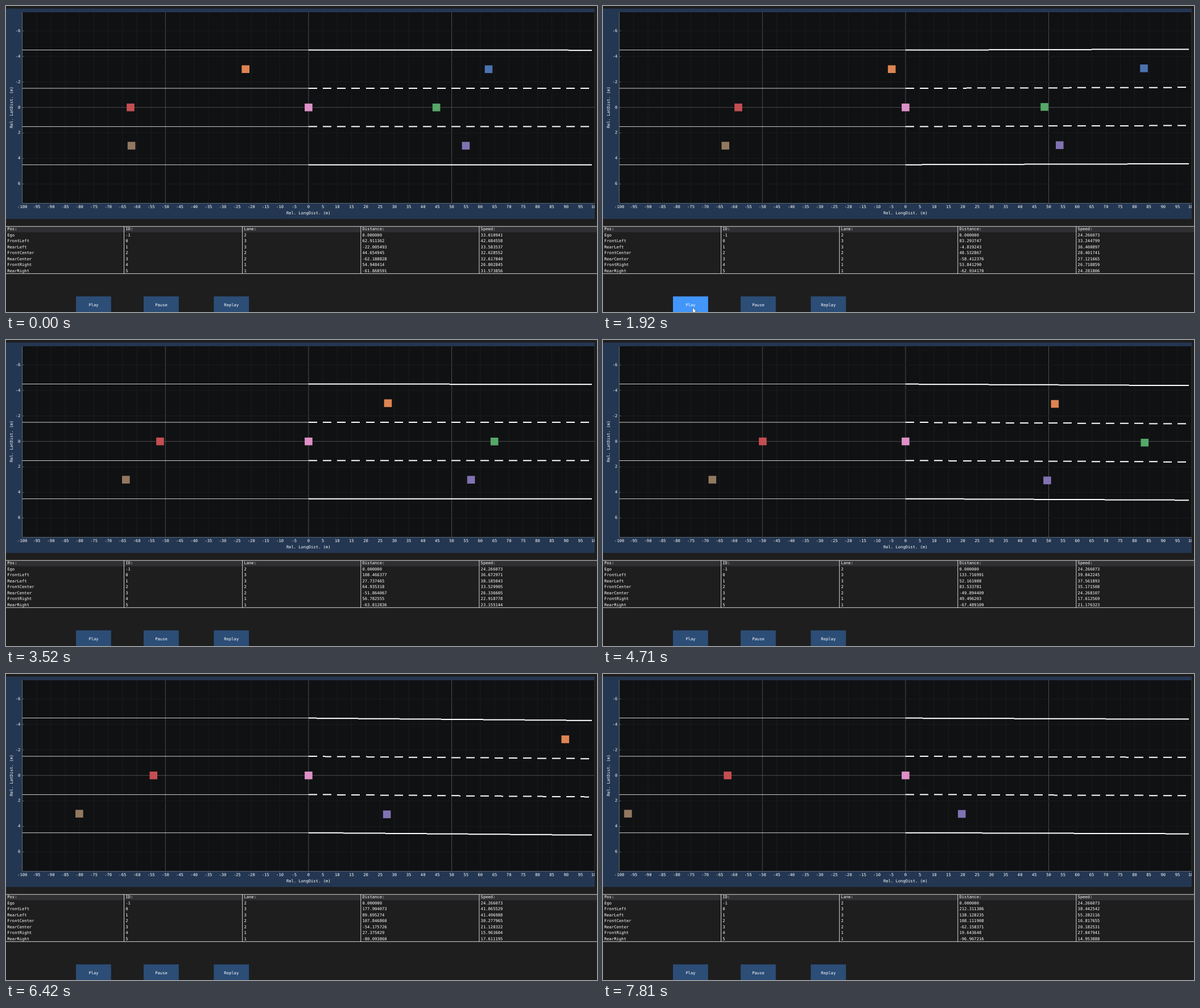
Write an HTML page with a canvas that moves like this. It is 1039x539 px and loops after 7.88 s.

```html
<!DOCTYPE html>
<html lang="en">
<head>
<meta charset="utf-8">
<title>Lane view</title>
<style>
  html, body { margin: 0; width: 100%; height: 100%; overflow: hidden; background: #1e1e1e; }
  canvas { display: block; }
</style>
</head>
<body>
<canvas id="stage" width="1039" height="539"></canvas>
<script>
const ctx = document.getElementById('stage').getContext('2d');
const LOOP = 7880, HOLD = 460, STEP = 66.2, LAST_STEP = 111;
const PLOT = { left: 28.5, top: 11, right: 1035, bottom: 347 };
const METER = 5.032; // px per metre along the road
const px = d => 531.9 + METER * d;
const py = lat => 178.65 + 22.47 * lat;

// Smooth polynomial through five points, placed at these simulation steps (0.1 s each).
const KNOTS = [-1, 22, 46, 75, 111];
const curve = (...points) => step => points.reduce((sum, point, i) =>
  sum + KNOTS.reduce((term, knot, j) =>
    j === i ? term : term * (step - knot) / (KNOTS[i] - knot), point), 0);

const laneDrift = curve(.125, -1.7, .23, 3.6, 1.9); // px at 99 m
const egoSpeedAt = step => Math.max(24.266073, 33.010941 - .55 * (step + 1));
const CARS = [
  { name: 'FrontLeft', lane: 3, color: '#4c72b0',
    distance: curve(62.911362, 83.293747, 108.466377, 151.699432, 212.311386) },
  { name: 'RearLeft', lane: 3, color: '#dd8452',
    distance: curve(-22.005493, -4.819243, 27.737465, 66.941475, 138.128235) },
  { name: 'FrontCenter', lane: 2, color: '#55a868',
    distance: curve(44.654945, 48.532867, 64.935318, 95.251289, 108.111908) },
  { name: 'RearCenter', lane: 2, color: '#c44e52',
    distance: curve(-62.188828, -58.412376, -51.864067, -50.683453, -62.158371) },
  { name: 'FrontRight', lane: 1, color: '#8172b3',
    distance: curve(54.948414, 53.841290, 56.782555, 40.846386, 19.643648) },
  { name: 'RearRight', lane: 1, color: '#937860',
    distance: curve(-61.868591, -62.934170, -63.812836, -71.684166, -96.967216) }
];

function rect(x, y, w, h, color) {
  ctx.fillStyle = color;
  ctx.fillRect(x, y, w, h);
}
const hLine = (x1, x2, y, color, width = 1) => rect(x1, y - width / 2, x2 - x1, width, color);
const vLine = (x, y1, y2, color, width = 1) => rect(x - width / 2, y1, width, y2 - y1, color);

function text(str, x, y, align = 'left') {
  ctx.fillStyle = '#fff';
  ctx.textAlign = align;
  ctx.fillText(str, x, y);
}

function clipped(x, y, w, h, paint) {
  ctx.save();
  ctx.beginPath();
  ctx.rect(x, y, w, h);
  ctx.clip();
  paint();
  ctx.restore();
}

function drawAxes() {
  const faint = '#1b1c1e', strong = '#4b4c4e', edge = '#5c6470';
  const { left, top, right, bottom } = PLOT;
  rect(0, 4.5, 1035, 370.5, '#243752');
  rect(left, top, right - left, bottom - top, '#101113');
  clipped(0, 0, 1035, 375, () => {
    for (let d = -100; d <= 100; d += 5) {
      vLine(px(d), top, bottom, d % 50 ? faint : strong);
      text(d, px(d), 354.3, 'center');
    }
    for (let lat = -6; lat <= 6; lat += 2) {
      hLine(left, right, py(lat), lat ? faint : strong);
      hLine(left, left + 3, py(lat), edge);
      text(lat, 25.3, py(lat), 'right');
    }
    vLine(left, top, bottom, edge);
    hLine(left, right, bottom + .5, edge);
  });
  text('Rel. LongDist. (m)', 531.7, 365.5, 'center');
  ctx.save();
  ctx.translate(10.3, 178.5);
  ctx.rotate(-Math.PI / 2);
  text('Rel. LatDist. (m)', 0, 0, 'center');
  ctx.restore();
}

function drawLanes(drift) {
  const grid = .615; // lines shift in whole steps of this size
  for (let lat = -4.5; lat <= 4.5; lat += 3) {
    const y = py(lat), dashed = Math.abs(lat) < 2;
    hLine(PLOT.left, 532, y, '#fff', .8);
    for (let x = 532; x < 1030; x++) {
      const d = (x - 531.4) / METER;
      if (dashed && d % 5 > 3) continue;
      const shift = grid * Math.floor((drift * d / 99 + .3 - .0445 * lat) / grid);
      rect(x, y - 1 + shift, 1, 2, '#fff');
    }
  }
}

function drawCar(d, lat, drift, color) {
  const y = py(lat) + drift * Math.max(d, 0) / 99;
  rect(px(d) - 6.8, y - 6.8, 13.6, 13.6, color);
}

function drawTable(rows) {
  const columnWidth = 208.1;
  rect(0, 388, 1039, 10.5, '#303033');
  rows.forEach((row, r) => row.forEach((cell, c) =>
    text(cell, 2.2 + columnWidth * c, 393.4 + 10.5 * r)));
  hLine(0, 1039, 388.2, '#fff', .8);
  hLine(0, 1039, 471.3, '#fff', .8);
  for (let c = 1; c < 5; c++) vLine(columnWidth * c - .5, 388, 471.5, '#fff', .8);
}

function drawButton(label, x, hovered) {
  rect(x, 511.5, 61.8, 27.5, hovered ? '#4296fa' : '#2b4d76');
  text(label, x + 31, 526.7, 'center');
}

function drawCursor(x, y) {
  const arrow = new Path2D('M0 0V10L2.2 8L4 12L5.5 11.3L3.8 7.3H7Z');
  ctx.save();
  ctx.translate(x, y);
  ctx.fillStyle = '#fff';
  ctx.strokeStyle = '#333';
  ctx.lineWidth = .6;
  ctx.fill(arrow);
  ctx.stroke(arrow);
  ctx.restore();
}

function draw(time) {
  const step = Math.max(-1, Math.min(LAST_STEP, Math.floor((time - HOLD) / STEP)));
  const drift = laneDrift(step), egoSpeed = egoSpeedAt(step);
  const hovered = step >= 0 && step < 30;
  const cars = CARS.map(car => {
    const slope = (car.distance(step + .5) - car.distance(step - .5)) * 10;
    return { ...car, d: car.distance(step), speed: egoSpeed + slope };
  });

  rect(0, 0, 1039, 539, '#1e1e1e');
  ctx.font = '7.16px "DejaVu Sans Mono", monospace';
  ctx.textRendering = 'geometricPrecision';
  ctx.textBaseline = 'middle';
  drawAxes();
  clipped(PLOT.left, PLOT.top, PLOT.right - PLOT.left, PLOT.bottom - PLOT.top, () => {
    drawLanes(drift);
    cars.forEach(car => drawCar(car.d, 3 * (2 - car.lane), drift, car.color));
    drawCar(0, 0, 0, '#de90c7');
  });

  drawTable([
    ['Pos:', 'ID:', 'Lane:', 'Distance:', 'Speed:'],
    ['Ego', -1, 2, '0.000000', egoSpeed.toFixed(6)],
    ...cars.map((car, id) => [car.name, id, car.lane, car.d.toFixed(6), car.speed.toFixed(6)])
  ]);
  drawButton('Play', 123, hovered);
  drawButton('Pause', 242, false);
  drawButton('Replay', 365.3, false);
  if (hovered) drawCursor(157.5, 531);
}

function tick() {
  draw(performance.now() % LOOP);
  requestAnimationFrame(tick);
}
tick();
</script>
</body>
</html>
```
